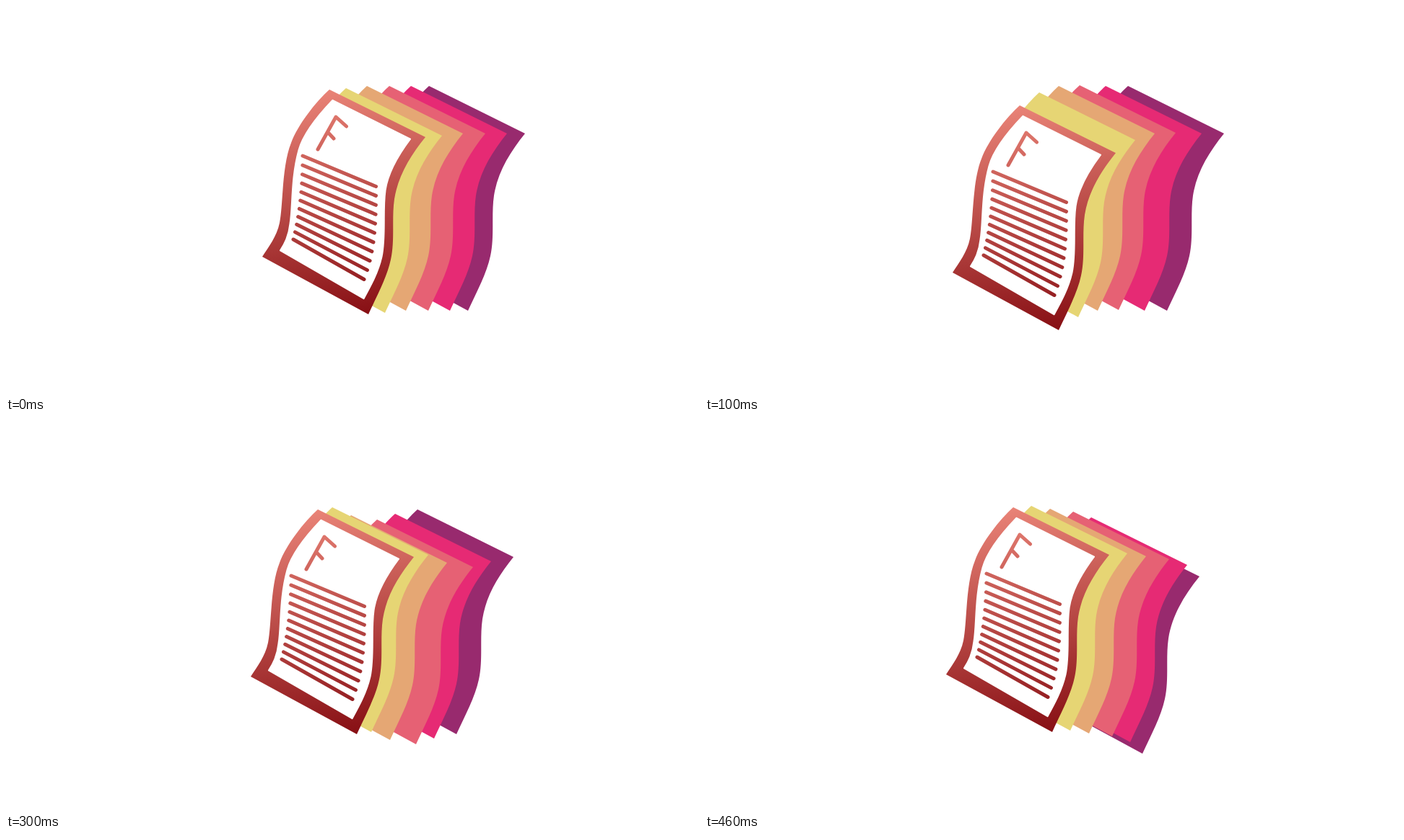
An HTML page that plays this animation: 960 px wide and 540 px high, repeating every 0.5 s.

```html
<!DOCTYPE html>
<html lang="en">
<head>
<meta charset="utf-8">
<title>Paper stack</title>
<style>
html, body { margin: 0; width: 100%; height: 100%; overflow: hidden; background: #fff; }
svg { display: block; width: 100vw; height: 100vh; }
</style>
</head>
<body>
<svg viewBox="0 0 960 540">
  <defs>
    <linearGradient id="ink" gradientUnits="userSpaceOnUse" x1="448" y1="116" x2="495" y2="429">
      <stop offset="0" stop-color="#e98377"/>
      <stop offset="1" stop-color="#870f14"/>
    </linearGradient>
    <path id="sheet" d="M448 116L581 182C560 208 543 236 538 268C534 295 539 325 533 352C528 376 514 402 502 428L355 348C364 334 375 320 379 301C384 276 382 222 395 190C404 165 430 132 448 116Z"/>
  </defs>
  <g id="stack"></g>
</svg>
<script>
const NS = 'http://www.w3.org/2000/svg';
const STEP = 100, STEPS = 5, RULES = 11;

// Back to front: each sheet's colour and the key points it jumps through.
const sheets = [
  { fill: '#982a6e', x: [138, 138, 130, 122, 104], y: [-5, -5, -3, 4, 31] },
  { fill: '#e62a74', x: [113, 107, 97, 91, 87], y: [-5, -5, 7, 10, 15] },
  { fill: '#e66174', x: [83, 71, 61, 66, 62], y: [-5, -6, 15, 18, 7] },
  { fill: '#e5a774', x: [52, 42, 30, 30, 30], y: [-5, -5, 24, 12, 3] },
  { fill: '#e6d574', x: [23, 15, 5, 4, 4], y: [-2, 4, 13, 1, -1] },
  { fill: 'url(#ink)', x: [0, -12, -12, -16, -21], y: [0, 22, -8, 4, 1] }
];

const page = 'M452.5 130.8L560 184.7C544 206 529 232 525.5 256C521.5 285 526.5 320 520.5 348C515.5 370 505 389 495.5 406.2' +
  'L380 339.4C386 330 391.5 320 393.5 302C397.5 278 394.5 240 405.5 200C412.5 175 437 147 452.5 130.8Z';
const letter = 'M432 199L457 154L471.5 167M446.5 176L454 184';

function add(parent, tag, attrs) {
  const el = document.createElementNS(NS, tag);
  for (const k in attrs) el.setAttribute(k, attrs[k]);
  return parent.appendChild(el);
}

// Ruled lines follow the bend of the page and close up towards its foot.
function rule(i) {
  const left = [411 - 0.13 * i ** 2, 208 + 13.2 * i - 0.16 * i ** 2];
  const right = [512.5 - 0.0165 * i ** 3, 250.5 + 12.9 * i];
  return `M${left}L${right}`;
}

const stack = document.getElementById('stack');
for (const s of sheets) {
  s.el = add(stack, 'g', {});
  add(s.el, 'use', { href: '#sheet', fill: s.fill });
}

const front = sheets[sheets.length - 1].el;
add(front, 'path', { d: page, fill: '#fff', stroke: '#fff', 'stroke-width': 2, 'stroke-linejoin': 'round' });
const lines = Array.from({ length: RULES }, (_, i) => rule(i)).join('');
add(front, 'path', {
  d: letter + lines, fill: 'none', stroke: 'url(#ink)', 'stroke-width': 5,
  'stroke-linecap': 'round', 'stroke-linejoin': 'round'
});

function draw(ms) {
  const k = Math.floor(ms / STEP) % STEPS;
  for (const { el, x, y } of sheets) el.setAttribute('transform', `translate(${x[k]} ${y[k]})`);
}

const start = performance.now();
function tick() {
  draw(performance.now() - start);
  requestAnimationFrame(tick);
}
tick();
</script>
</body>
</html>
```
